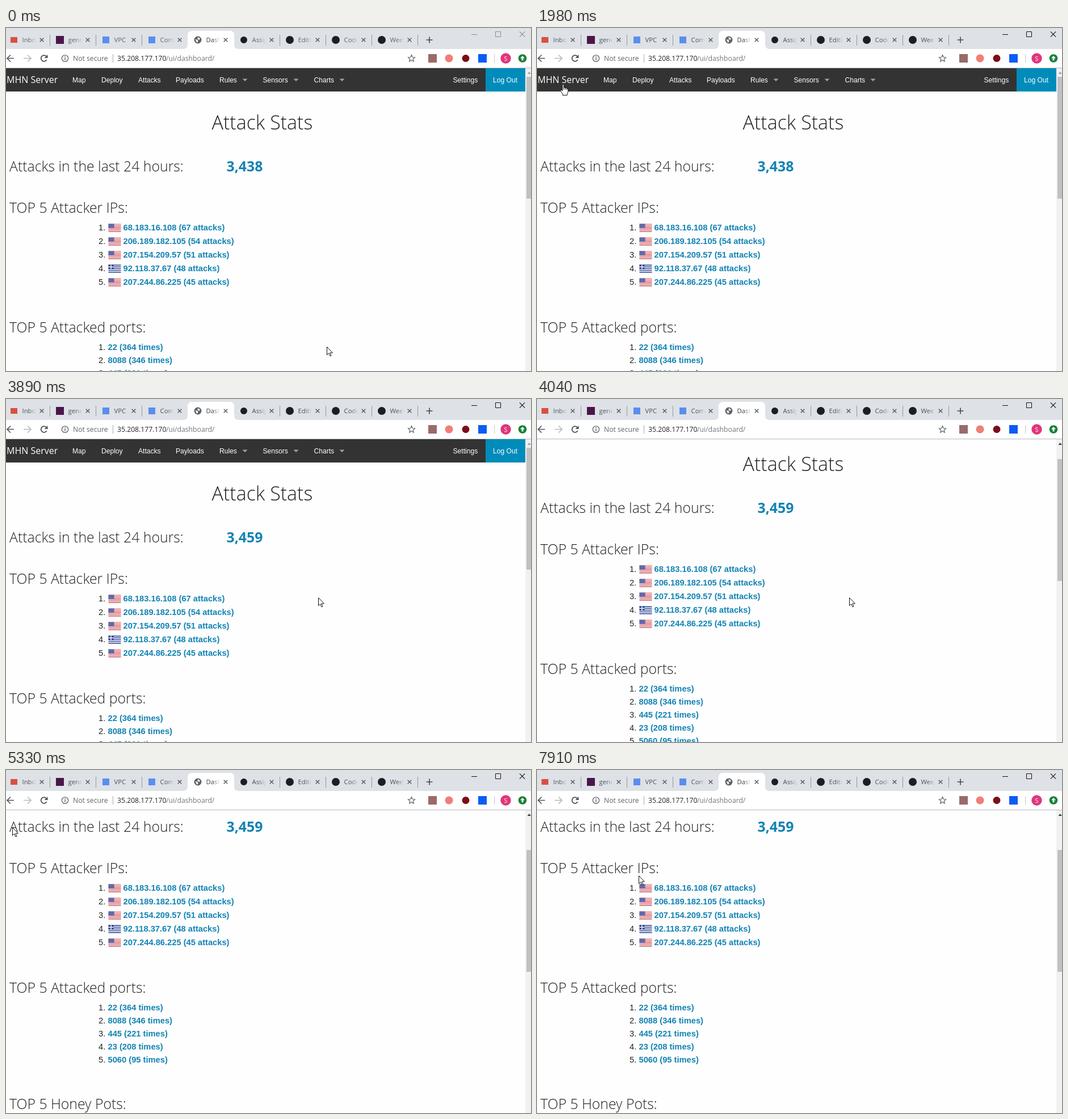
Write an HTML page with a canvas that moves like this. It is 925 px wide and 605 px high and loops after 8 s.

```html
<!DOCTYPE html>
<html lang="en">
<head>
<meta charset="utf-8">
<title>Attack dashboard</title>
<style>
  html, body { margin: 0; width: 100%; height: 100%; overflow: hidden; background: #fff; }
  canvas { display: block; }
</style>
</head>
<body>
<canvas id="stage" width="925" height="605"></canvas>
<script>
const ctx = document.getElementById('stage').getContext('2d');
const LOOP = 8000;
const OPEN = '"Open Sans", sans-serif';
const ARIAL = '"Liberation Sans", Arial, sans-serif';
const LINK = '#1283b4';
const GREY = '#5f6368';

const text = (str, x, y, font, color) => {
  ctx.font = font;
  ctx.fillStyle = color;
  ctx.fillText(str, x, y);
};
const rect = (x, y, w, h, color) => {
  ctx.fillStyle = color;
  ctx.fillRect(x, y, w, h);
};
const disc = (x, y, r, color) => {
  ctx.fillStyle = color;
  ctx.beginPath();
  ctx.arc(x, y, r, 0, Math.PI * 2);
  ctx.fill();
};
const ring = (x, y, r, color, width, from = 0, to = Math.PI * 2) => {
  ctx.strokeStyle = color;
  ctx.lineWidth = width;
  ctx.beginPath();
  ctx.arc(x, y, r, from, to);
  ctx.stroke();
};
const fillPath = (d, color) => {
  ctx.fillStyle = color;
  ctx.fill(new Path2D(d));
};
const strokePath = (d, color, width) => {
  ctx.strokeStyle = color;
  ctx.lineWidth = width;
  ctx.stroke(new Path2D(d));
};
const cross = (x, y, r, color, width) =>
  strokePath(`M${x - r} ${y - r}l${2 * r} ${2 * r}m0 ${-2 * r}l${-2 * r} ${2 * r}`, color, width);
const at = (x, y, draw) => {
  ctx.save();
  ctx.translate(x, y);
  draw();
  ctx.restore();
};

// Timeline

// start, end, number of jumps, destination x, y
const moves = [
  [420, 540, 2, 306, 195],
  [860, 1000, 2, 141, 184],
  [1400, 1710, 3, 46, 99],
  [2120, 2390, 3, 67, 53],
  [2670, 2940, 3, 430, 322],
  [3070, 3570, 4, 550, 350],
  [4550, 4790, 3, 154, 219],
  [4940, 5330, 4, 11, 101],
  [5460, 5730, 3, 6, 95],
  [6120, 6400, 3, 48, 135],
  [6690, 6960, 3, 390, 97],
  [7100, 7370, 3, 370, 351],
  [7510, 7650, 2, 348, 319],
  [7770, 7910, 2, 179, 186],
];

function pointerAt(t) {
  let x = 565, y = 562;
  for (const [start, end, jumps, toX, toY] of moves) {
    if (t < start) break;
    const done = 1 + Math.floor((t - start) / (end - start) * (jumps - 1) + 1e-6);
    const part = Math.min(1, done / jumps);
    x += (toX - x) * part;
    y += (toY - y) * part;
  }
  return [Math.round(x), Math.round(y)];
}

const scrollAt = t => t < 4040 ? 0 : t < 4160 ? 52 : t < 4300 ? 118 : 144;

// Page

function stripedFlag(x, y) {
  for (let i = 0; i < 13; i++) rect(x, y + i * 14 / 13, 22, 14 / 13, i % 2 ? '#f6e3e3' : '#d9535a');
  rect(x, y, 10, 7.5, '#5059a0');
  for (let i = 0; i < 12; i++) rect(x + 1 + i % 4 * 2.3, y + 1 + Math.floor(i / 4) * 2.2, 1, 1, '#a5abd2');
  rect(x, y + 13.2, 22, 0.8, 'rgba(90,40,60,.4)');
}

function crossFlag(x, y) {
  for (let i = 0; i < 9; i++) rect(x, y + i * 14 / 9, 22, 14 / 9, i % 2 ? '#eef0f8' : '#2f4190');
  rect(x, y, 9, 7.8, '#2f4190');
  rect(x + 3.7, y, 1.6, 7.8, '#eef0f8');
  rect(x, y + 3.1, 9, 1.6, '#eef0f8');
}

const attackers = ['68.183.16.108 (67 attacks)', '206.189.182.105 (54 attacks)',
  '207.154.209.57 (51 attacks)', '92.118.37.67 (48 attacks)', '207.244.86.225 (45 attacks)'];
const ports = ['22 (364 times)', '8088 (346 times)', '445 (221 times)', '23 (208 times)', '5060 (95 times)'];
const menu = [['Map', 117], ['Deploy', 168], ['Attacks', 233], ['Payloads', 299],
  ['Rules', 376, 421], ['Sensors', 452.5, 511], ['Charts', 542.5, 592], ['Settings', 787.5], ['Log Out', 858]];

function listRow(index, str, x, y) {
  text(index + 1 + '.', 163, y, `14.7px ${ARIAL}`, '#222');
  text(str, x, y, `bold 14.7px ${ARIAL}`, LINK);
}

function drawPage(total) {
  rect(0, 71, 915, 41, '#333');
  rect(845, 71, 70, 41, '#008cba');
  text('MHN Server', 1, 97, `16px ${OPEN}`, '#fff');
  for (const [label, x, arrow] of menu) {
    text(label, x, 95.5, `12.1px ${ARIAL}`, '#fff');
    if (arrow) fillPath(`M${arrow - 4.5} 89.5h9l-4.5 4.5z`, '#a0a0a0');
  }

  const heading = (str, y) => text(str, 6, y, `300 24.8px ${OPEN}`, '#222');
  text('Attack Stats', 362.5, 179, `300 34px ${OPEN}`, '#222');
  heading('Attacks in the last 24 hours:', 253);
  text(total, 388.5, 253, `bold 24.8px ${OPEN}`, LINK);

  heading('TOP 5 Attacker IPs:', 326);
  attackers.forEach((str, i) => {
    const y = Math.round(357 + i * 24.1);
    (i === 3 ? crossFlag : stripedFlag)(180.5, y - 11.5);
    listRow(i, str, 206.5, y);
  });

  heading('TOP 5 Attacked ports:', 537);
  ports.forEach((str, i) => listRow(i, str, 179.5, 568 + i * 23));
  heading('TOP 5 Honey Pots:', 742);
}

function drawScrollbar(scroll) {
  rect(915, 71, 10, 534, '#f1f1f1');
  rect(917, 86 + Math.round(scroll * 0.382), 8, 215, '#c1c1c1');
  fillPath('M918.5 81h6.5l-3.2-4z', scroll ? '#404040' : '#a3a3a3');
}

// Browser frame

const tabs = ['Inbox', 'gener', 'VPC', 'Comp', 'Dash', 'Assign', 'Editin', 'Code', 'Week'];

function drawGlobe(x, y) {
  disc(x, y, 6.5, GREY);
  fillPath(`M${x - 4.5} ${y - 1}l4 1 1 2.5-2 2.5zM${x} ${y - 5}l4 2.5-1.5 2.5-3-1z`, '#fff');
}

function drawFavicon(i, x, loading, t) {
  const y = 21;
  if (i === 0) rect(x - 6, y - 5, 12, 10, '#d95040');
  else if (i === 1) rect(x - 7, y - 7, 14, 14, '#4a1649');
  else if (i < 4) rect(x - 6, y - 6, 12, 12, '#5b8def');
  else if (i > 4) disc(x, y, i === 5 ? 6 : 7, '#1b1f23');
  else if (loading) {
    const angle = t / 160;
    ring(x, y, 6, '#4285f4', 1.8, angle, angle + 4);
  } else drawGlobe(x, y);
}

function drawTabs(t, focused, loading) {
  rect(0, 0, 925, 37, '#dee1e6');
  fillPath('M312 37Q320 37 320 29V13Q320 5 328 5H394Q402 5 402 13V29Q402 37 410 37z', '#fff');
  tabs.forEach((title, i) => {
    const x = 81 * i;
    const rgb = i === 4 ? '60,64,67' : focused ? '75,79,84' : '95,99,104';
    const fade = ctx.createLinearGradient(x + 41, 0, x + 53, 0);
    fade.addColorStop(0, `rgba(${rgb},1)`);
    fade.addColorStop(1, `rgba(${rgb},0)`);
    drawFavicon(i, x + 14, loading, t);
    text(title, x + 28.5, 25, `11.3px ${OPEN}`, title === 'VPC' ? `rgb(${rgb})` : fade);
    cross(x + 63, 21, 3.3, '#55595e', 1.4);
    if (i !== 3 && i !== 4) rect(x + 77, 12, 1, 19, '#94979c');
  });
  strokePath('M740.5 21h11m-5.5-5.5v11', '#45494d', 1.6);

  const control = focused ? '#111' : '#8c8e91';
  rect(820, 11, 10, 1, control);
  strokePath('M862.5 6.5h9v9h-9z', control, 1);
  cross(909.5, 11, 4.6, control, 1.1);
}

function drawToolbar(loading) {
  rect(0, 37, 925, 33, '#fff');
  rect(0, 70, 925, 1, '#b6b8bb');
  strokePath('M14 53.5H2.5M8 47.5l-6 6 6 6', '#505459', 1.7);
  strokePath('M31 53.5h12M38 47.5l6 6-6 6', '#b8babd', 1.7);
  if (loading) cross(67.5, 53.5, 4.8, '#505459', 1.8);
  else {
    ring(67, 53.5, 5.3, '#505459', 1.8, 0.5, 5.5);
    fillPath('M73.5 47v6h-6z', '#505459');
  }

  ring(104, 53.5, 5.7, GREY, 1.3);
  rect(103.3, 52.5, 1.5, 4, GREY);
  rect(103.3, 50, 1.5, 1.5, GREY);
  text('Not secure', 118, 58, `12.2px ${OPEN}`, GREY);
  rect(188, 46, 1, 15, '#a8abaf');
  text('35.208.177.170', 196, 58, `12.2px ${OPEN}`, '#202124');
  text('/ui/dashboard/', 282, 58, `12.2px ${OPEN}`, '#70757a');

  strokePath('M714.5 47.5l1.7 4 4.3.4-3.3 2.8 1 4.3-3.7-2.3-3.7 2.3 1-4.3-3.3-2.8 4.3-.4z', GREY, 1.2);
  rect(744, 46, 15, 15, '#9a6a6a');
  disc(780.5, 53.5, 7, '#ef7f78');
  disc(810, 53.5, 6.5, '#7c0d18');
  rect(832, 46, 15, 15, '#0a5cf5');
  rect(860, 46, 1, 15, '#c4c7cb');
  disc(880.5, 53.5, 9.2, '#e0367c');
  text('S', 877.6, 57.5, `10.5px ${OPEN}`, '#fff');
  disc(910, 53.5, 7.3, '#188038');
  fillPath('M910 49l4 4.3h-2.6v4h-2.8v-4H906z', '#fff');
}

function drawPointer(x, y, hand) {
  at(x, y, () => {
    const outline = hand
      ? 'M-1.2 .8Q0-.8 1.2.8V6.4Q3 5.2 4 7Q5.8 6 6.6 7.8Q8.6 7.2 8.8 9.2V13.5L7.2 17V19.5H-.8V17.4L-4.6 12Q-5.2 9.6-3.2 10L-1.2 12z'
      : 'M.5.5V14.6L3.7 11.6 6 16.8 8 15.9 5.8 10.9H10.4z';
    ctx.lineJoin = 'round';
    fillPath(outline, '#fff');
    strokePath(outline, '#111', 1);
    if (hand) strokePath('M1.2 6.4V10M4 7v3M6.6 7.8v2.5', '#111', 0.9);
  });
}

function draw(t) {
  const scroll = scrollAt(t);
  const loading = t >= 2530 && t < 3200;
  const [x, y] = pointerAt(t);

  rect(0, 0, 925, 605, '#fefefe');
  at(0, -scroll, () => drawPage(t < 3200 ? '3,438' : '3,459'));
  drawScrollbar(scroll);
  drawTabs(t, t >= 1980, loading);
  drawToolbar(loading);
  drawPointer(x, y, !scroll && x < 100 && y > 80 && y < 112);
}

function frame() {
  draw(performance.now() % LOOP);
  requestAnimationFrame(frame);
}
frame();
</script>
</body>
</html>
```
